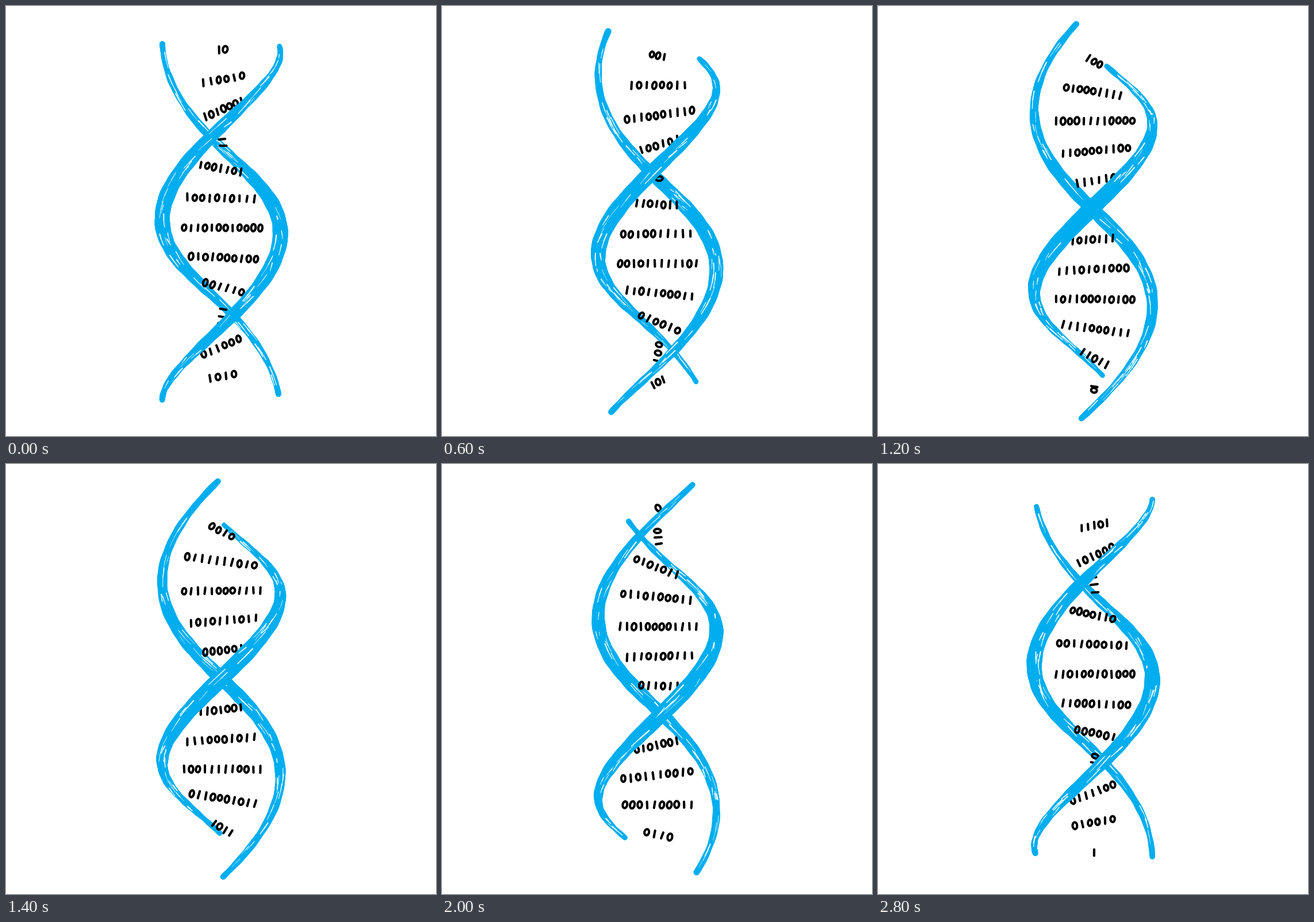
An HTML page with a canvas that plays this animation: 748 px wide and 748 px high, repeating every 3 s.

```html
<!DOCTYPE html>
<html lang="en">
<head>
<meta charset="utf-8">
<title>Binary helix</title>
<style>
  html, body { margin: 0; width: 100%; height: 100%; overflow: hidden; background: #fff; }
  canvas { display: block; }
</style>
</head>
<body>
<canvas id="stage" width="748" height="748"></canvas>
<script>
const ctx = document.getElementById('stage').getContext('2d');
const BLUE = '#00aeef';
const CENTER_X = 374.5, CENTER_Y = 374;
const RADIUS = 102, HALF_LENGTH = 306, HALF_TURN = 310;
const PERSPECTIVE = 0.124;
const POSES = 15, POSE_MS = 200;
const RUNG_GAP = HALF_TURN / 6, RUNG_REACH = 0.65, DIGIT_GAP = 12.5;

function seeded(seed) {
  let s = seed >>> 0;
  return () => {
    s = s + 0x6d2b79f5 >>> 0;
    let t = Math.imul(s ^ s >>> 15, s | 1);
    t ^= t + Math.imul(t ^ t >>> 7, t | 61);
    return ((t ^ t >>> 14) >>> 0) / 4294967296;
  };
}

// Turn of the helix at height v: cosine points right, sine towards the viewer.
const turnAt = (v, pose) =>
  Math.PI * ((v + HALF_LENGTH) / HALF_TURN - pose / POSES - 1 / 60);

function project(v, turn, reach = 1) {
  const z = Math.sin(turn) * reach;
  const scale = 1 + PERSPECTIVE * z;
  return { x: CENTER_X + RADIUS * Math.cos(turn) * reach * scale, y: CENTER_Y + v * scale, z };
}

function strandWidth(v, z) {
  const bulge = Math.cos(Math.PI * v / 640) ** 2;
  return (9.5 + 16.5 * bulge) * (1 + 0.1 * z);
}

// A point on a strand, moved sideways by a share of the strand's width.
function strandPoint(v, pose, phase, side = 0) {
  const at = h => project(h, turnAt(h, pose) + phase);
  const p = at(v), a = at(v - 1), b = at(v + 1);
  const length = Math.hypot(b.x - a.x, b.y - a.y);
  const w = strandWidth(v, p.z);
  return {
    x: p.x - (b.y - a.y) / length * w * side,
    y: p.y + (b.x - a.x) / length * w * side,
    z: p.z, w
  };
}

function line(a, b, width, color) {
  ctx.strokeStyle = color;
  ctx.lineWidth = width;
  ctx.beginPath();
  ctx.moveTo(a.x, a.y);
  ctx.lineTo(b.x, b.y);
  ctx.stroke();
}

function drawStrand(pose, phase, front) {
  const random = seeded(pose * 97 + (phase ? 41 : 7));
  const wobble = random() * 6;
  for (let v = -HALF_LENGTH; v < HALF_LENGTH; v += 2) {
    const a = strandPoint(v, pose, phase), b = strandPoint(v + 2, pose, phase);
    if (a.z >= 0 !== front) continue;
    const rough = 0.7 * Math.sin(v / 9 + wobble) + 0.5 * Math.sin(v / 4 + wobble * 2);
    line(a, b, a.w + rough, BLUE);
  }
  // Thin gaps left between the pen strokes
  for (let i = 0; i < 40; i++) {
    const v = (random() * 2 - 1) * (HALF_LENGTH - 16);
    const length = 9 + random() * 19;
    const side = (random() - 0.5) * 0.64, drift = (random() - 0.5) * 0.24;
    const width = 0.7 + random() * 1.4;
    const a = strandPoint(v - length / 2, pose, phase, side);
    const m = strandPoint(v, pose, phase, side + drift / 2);
    const b = strandPoint(v + length / 2, pose, phase, side + drift);
    if (m.z >= 0 !== front) continue;
    line(a, m, width, '#fff');
    line(m, b, width * 0.7, '#fff');
  }
}

function drawDigit(x, y, angle, random) {
  const height = 5 + random() * 1.3;
  ctx.save();
  ctx.translate(x, y);
  ctx.rotate(angle + (random() - 0.5) * 0.24);
  ctx.beginPath();
  if (random() < 0.48) {
    ctx.ellipse(0, 0, 3.5 + random() * 0.7, height, 0.12, 0, 2 * Math.PI);
  } else {
    ctx.moveTo(0.3, -height);
    ctx.lineTo(-0.3, height);
  }
  ctx.lineWidth = 4.1;
  ctx.strokeStyle = '#000';
  ctx.stroke();
  ctx.restore();
}

function drawRungs(pose) {
  const random = seeded(pose * 31 + 5);
  const first = 8 - HALF_LENGTH + (pose * HALF_TURN / POSES) % RUNG_GAP;
  for (let v = first; v < HALF_LENGTH; v += RUNG_GAP) {
    const reach = RUNG_REACH * Math.min(1, (HALF_LENGTH - Math.abs(v)) / 100);
    let turn = turnAt(v, pose);
    if (Math.cos(turn) < 0) turn += Math.PI;
    const right = project(v, turn, reach), left = project(v, turn + Math.PI, reach);
    const dx = right.x - left.x, dy = right.y - left.y;
    const gaps = Math.round(Math.hypot(dx, dy) / DIGIT_GAP);
    const angle = Math.atan2(dy, dx);
    for (let i = 0; i <= gaps; i++) {
      const u = gaps ? i / gaps : 0.5;
      const jitter = (random() - 0.5) * 1.4;
      drawDigit(left.x + dx * u + 1.5, left.y + dy * u + jitter, angle, random);
    }
  }
}

function draw(pose) {
  ctx.fillStyle = '#fff';
  ctx.fillRect(0, 0, 748, 748);
  ctx.lineCap = 'round';
  const strands = front => [0, Math.PI].forEach(phase => drawStrand(pose, phase, front));
  strands(false);
  drawRungs(pose);
  strands(true);
}

let shown = -1;
const start = performance.now();
function tick() {
  const pose = Math.floor((performance.now() - start) / POSE_MS) % POSES;
  if (pose !== shown) draw(shown = pose);
  requestAnimationFrame(tick);
}
tick();
</script>
</body>
</html>
```
